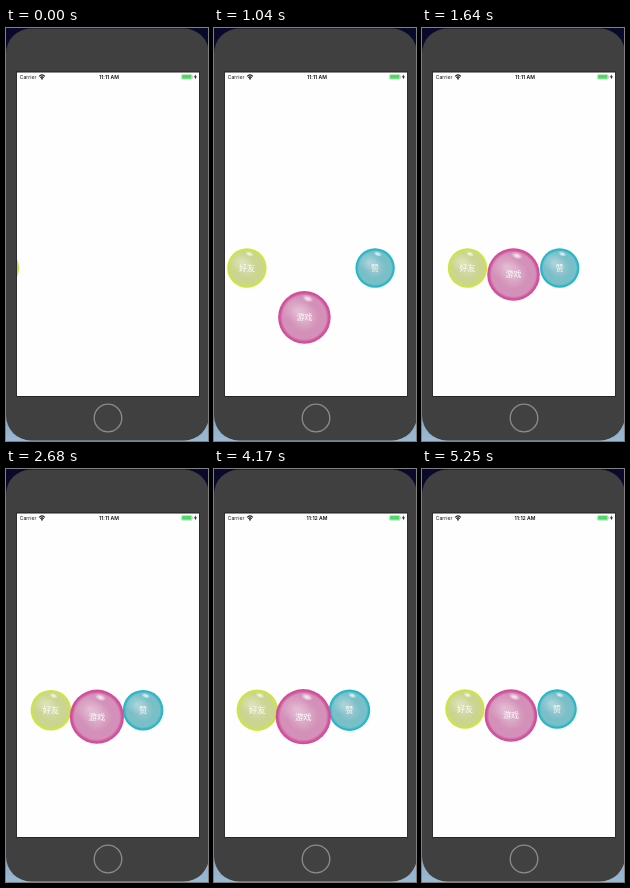
An HTML page for the animation above (5.35 s loop, 202 by 413 pixels).

```html
<!DOCTYPE html>
<html lang="zh">
<head>
<meta charset="utf-8">
<title>Bubbles</title>
<style>
  html, body { margin: 0; width: 100%; height: 100%; overflow: hidden; background: #404040; }
  svg { display: block; width: 202px; height: 413px; }
  .status { font: 5.1px Inter, "Open Sans", sans-serif; fill: #111; }
  .clock { font-weight: 600; text-anchor: middle; }
  .label { font: 8px "Noto Sans CJK SC", "Noto Sans CJK", sans-serif; fill: #fff; fill-opacity: .92; text-anchor: middle; }
</style>
</head>
<body>
<svg viewBox="0 0 202 413">
  <defs>
    <linearGradient id="desk" x2="0" y2="1">
      <stop offset="0" stop-color="#08082a"/>
      <stop offset=".5" stop-color="#2a3046"/>
      <stop offset="1" stop-color="#9bb9d3"/>
    </linearGradient>
    <radialGradient id="shine">
      <stop offset="0" stop-color="#fff" stop-opacity=".6"/>
      <stop offset="1" stop-color="#fff" stop-opacity="0"/>
    </radialGradient>
    <clipPath id="screen"><rect x="11" y="44" width="182" height="324"/></clipPath>
  </defs>

  <rect width="202" height="413" fill="url(#desk)"/>
  <rect x="0" y="0.5" width="203" height="412" rx="25" fill="#404040"/>
  <rect x="10.5" y="43.5" width="183" height="325.2" fill="#1c1c1c"/>
  <rect x="11" y="44.5" width="182" height="323.5" fill="#fefefe"/>
  <circle cx="102" cy="390" r="13.8" fill="#414141" stroke="#8c8c8c" stroke-width="1.3"/>

  <text class="status" x="13.7" y="51">Carrier</text>
  <g fill="none" stroke="#111" stroke-width="1.1">
    <path d="M33.1 48.3Q36 45.5 38.9 48.3M34.3 49.6Q36 48 37.7 49.6"/>
    <circle cx="36" cy="50.7" r=".35"/>
  </g>
  <text class="status clock" id="clock" x="103" y="51">11:11 AM</text>
  <rect x="175.3" y="46.5" width="11" height="4.8" rx="1.2" fill="#fff" stroke="#a9c9ae" stroke-width=".6"/>
  <rect x="176" y="47.1" width="9.6" height="3.6" rx=".7" fill="#4cd964"/>
  <path d="M187 48.1v1.6" stroke="#a9c9ae" stroke-width=".7"/>
  <path d="M190 46.3L187.9 49.3H189.3L188.8 51.5L191 48.4H189.6Z" fill="#111"/>

  <g id="stage" clip-path="url(#screen)"></g>
</svg>
<script>
  const LOOP = 5350, LAST = 5250, REST_Y = 240;

  // x, y: resting place; dx, dy: entry offset; from, span: entry timing
  const bubbles = [
    { text: '好友', r: 19.7, x: 45.5, y: REST_Y, dx: -55, dy: 0, from: -290, span: 1950,
      core: '#d5dbb2', mid: '#cbd590', rim: '#cde446' },
    { text: '赞', r: 19.7, x: 137.7, y: REST_Y, dx: 109, dy: 0, from: -180, span: 1760,
      core: '#a5cacf', mid: '#79bfc8', rim: '#28b6c6' },
    { text: '游戏', r: 26.3, x: 91.5, y: REST_Y + 6.5, dx: 0, dy: 196, from: -230, span: 1840, lean: -1.1,
      core: '#dfb9cf', mid: '#d391b9', rim: '#d24f9b' }
  ];

  const drift = [[1640, 0], [2680, -.6], [3570, -1.7], [4170, -2.2], [5250, -2.6]];
  const sag = [[1900, 0], [2680, 1.2], [4170, 1.2], [4950, 0]];
  const lean = [[1040, 1], [1640, 0]];

  const stage = document.getElementById('stage');
  const clock = document.getElementById('clock');

  stage.innerHTML = bubbles.map(({ text, r, core, mid, rim }, i) => `
    <g>
      <radialGradient id="skin${i}">
        <stop offset="0" stop-color="${core}"/>
        <stop offset=".55" stop-color="${mid}"/>
        <stop offset=".83" stop-color="${mid}"/>
        <stop offset=".93" stop-color="${rim}"/>
        <stop offset="1" stop-color="${rim}"/>
      </radialGradient>
      <circle r="${r}" fill="url(#skin${i})"/>
      <g transform="scale(${r})" fill="url(#shine)">
        <ellipse cx="-.3" cy="-.3" rx=".56" ry=".5" opacity=".55"/>
        <ellipse cx=".13" cy="-.72" rx=".24" ry=".14" transform="rotate(20 .13 -.72)"/>
        <ellipse cx=".13" cy="-.7" rx=".2" ry=".1" transform="rotate(20 .13 -.7)"/>
      </g>
      <text class="label" y="2.9">${text}</text>
    </g>`).join('');
  const nodes = [...stage.children];

  const clamp = v => Math.min(1, Math.max(0, v));

  function along(points, t) {
    if (t <= points[0][0]) return points[0][1];
    for (let i = 1; i < points.length; i++) {
      const [t0, v0] = points[i - 1], [t1, v1] = points[i];
      if (t < t1) return v0 + (v1 - v0) * (t - t0) / (t1 - t0);
    }
    return points[points.length - 1][1];
  }

  // The picture holds still between ticks of roughly 150 ms.
  const tick = k => 150 * k - 10 * Math.floor((k + 5) / 8.6);

  function hold(t) {
    if (t >= LAST) return LAST;
    let k = 34;
    while (k > 0 && tick(k) > t) k--;
    return tick(k);
  }

  function draw(t) {
    const pulse = (1 + Math.cos(Math.PI * Math.min(1, Math.abs(t - 3570) / 1575))) / 2;
    const scale = 1 + .075 * pulse;
    bubbles.forEach((b, i) => {
      const left = (1 + Math.cos(Math.PI * clamp((t - b.from) / b.span))) / 2;
      const x = b.x + b.dx * left + along(drift, t) + (b.lean || 0) * along(lean, t);
      const y = b.y + b.dy * left + along(sag, t);
      nodes[i].setAttribute('transform', `translate(${x.toFixed(2)} ${y.toFixed(2)}) scale(${scale.toFixed(4)})`);
    });
    clock.textContent = t < 3000 ? '11:11 AM' : '11:12 AM';
  }

  function frame() {
    draw(hold(performance.now() % LOOP));
    requestAnimationFrame(frame);
  }
  frame();
</script>
</body>
</html>
```
